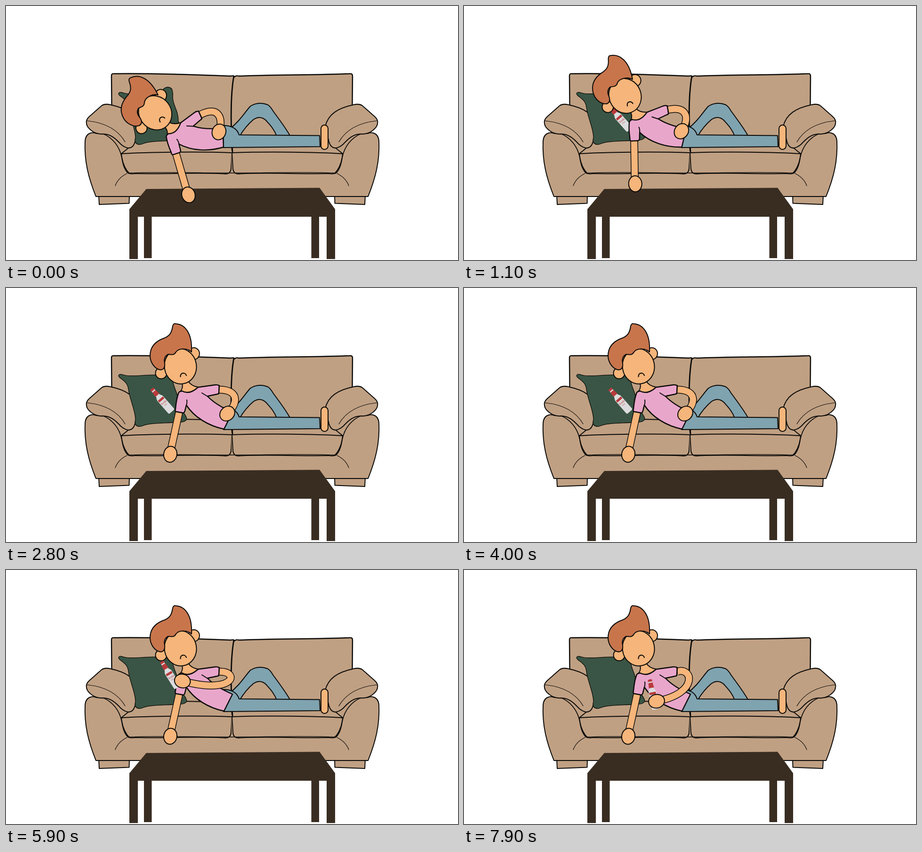
Write an HTML page with a canvas that moves like this. It is 960 px wide and 540 px high and loops after 8 s.

```html
<!DOCTYPE html>
<html lang="en">
<head>
<meta charset="utf-8">
<title>Sofa</title>
<style>
  html, body { margin: 0; width: 100%; height: 100%; overflow: hidden; background: #fff; }
  canvas { display: block; width: 960px; height: 540px; }
</style>
</head>
<body>
<canvas id="stage" width="960" height="540"></canvas>
<script>
const ctx = document.getElementById('stage').getContext('2d');
const INK = '#0a0a08', SOFA = '#c0a083', TABLE = '#392d22', GREEN = '#3a5545',
      JEANS = '#80a3b0', SHIRT = '#e9a6cb', SKIN = '#f6b57a', HAIR = '#c8754c',
      RED = '#b93a3c', GLASS = '#dcdcde';
const LOOP = 8000, STEP = 100;

function paint(path, fill, width) {
  if (fill) { ctx.fillStyle = fill; ctx.fill(path); }
  if (width) { ctx.lineWidth = width; ctx.strokeStyle = INK; ctx.stroke(path); }
}

function shape(d, fill, width = 2) {
  paint(new Path2D(d), fill, width);
}

function oval(x, y, rx, ry, angle = 0) {
  const path = new Path2D();
  path.ellipse(x, y, rx, ry, angle, 0, Math.PI * 2);
  paint(path, SKIN, 2);
}

// A skin-coloured tube with a thin outline
function limb(d) {
  const path = new Path2D(d);
  ctx.lineCap = 'butt';
  for (const [color, width] of [[INK, 16.5], [SKIN, 13.5]]) {
    ctx.strokeStyle = color;
    ctx.lineWidth = width;
    ctx.stroke(path);
  }
  ctx.lineCap = 'round';
}

const ramp = (t, from, to) => Math.min(1, Math.max(0, (t - from) / (to - from)));
const mix = (a, b, k) => a.map((v, i) => v + (b[i] - v) * k);

function sofaSide() {
  shape('M197 403L198 422L261.500 419.500L262 403Z', SOFA);
  shape('M191 405C175 365 166 330 168 287Q170 269 190 269H481V405Z', SOFA, 0);
  shape('M481 405H191C175 365 166 330 168 287Q169 273 180 270Q186 268 192 271', null);
  shape('M272 292L245 314', null, 1.8);
  shape('M330 281C400 277 450 281 478 286Q482 295 480 308', null, 1.8);
  shape('M245 314C247 335 251 347 258 354Q262 358 275 356C340 358 410 353 466 357Q477 357 478 346L480 312C400 309 300 311 245 314Z', SOFA);
  shape('M262 355C330 352 410 355 481 355', null, 1.3);
  shape('M205 271C228 281 241 299 246 322Q250 344 262 356', null, 1.8);
  shape('M232 382C236 371 245 362 257 356', null, 1.2);
  shape('M171 250Q169 242 177 235L203 212Q210 207 222 210C255 217 276 230 282 256L274 289Q270 302 260 302Q252 301 244 294C232 281 222 272 205 272Q196 273 188 269Q172 260 171 250Z', SOFA);
  shape('M172 244C210 248 238 263 253 289', null, 1.2);
}

function sofa() {
  shape('M225 270L224 148Q224 143 230 144C300 143 400 146 477 149Q484 147 485 151Q488 147 495 149C560 146 660 147 730 144Q736 143 736 149L735 270', SOFA, 2.4);
  for (const side of [1, -1]) {
    ctx.save();
    ctx.translate(480, 0);
    ctx.scale(side, 1);
    ctx.translate(-480, 0);
    sofaSide();
    ctx.restore();
  }
  shape('M484 149C478 180 476 240 481 310', null, 2.8);
}

function table() {
  shape('M298 389L666 386.500L699 432V448H262V432Z', TABLE, 0);
  ctx.fillStyle = TABLE;
  for (const x of [262, 681]) ctx.fillRect(x, 447, 18, 91);
  for (const x of [293, 648.5]) ctx.fillRect(x, 447, 16.5, 89);
}

function pillow() {
  shape('M239 187Q239 182 247 184C262 190 295 184 320 185Q331 183 335 176Q344 169 352 176Q355 182 354 195C356 215 366 222 366 245C372 262 384 270 384 279Q380 286 368 285C340 288 305 286 290 293Q280 297 275 290Q273 286 275 280C275 260 262 235 260 215C258 200 248 196 241 190Z', GREEN, 1.3);
}

function legs() {
  shape('M474 262C496 246 507 226 519 213Q536 202 556 210Q562 214 567 223C580 241 592 256 604 277H575C570 262 560 252 552 243Q540 232 526 241C514 251 505 262 496 277Z', JEANS);
  shape('M461 254C480 254 491 261 495 274L666 275.500L667 299L462 301Z', JEANS);
  shape('M669 260.500a7.500 7.500 0 0 1 15 0V297.500a7.500 7.500 0 0 1 -15 0Z', SKIN);
}

function bottle(x, y, degrees) {
  ctx.save();
  ctx.translate(x, y);
  ctx.rotate(degrees * Math.PI / 180);
  shape('M-4 4H4L4.500 19C5 22 8 24 8 28V62Q8 65 5 65H-5Q-8 65 -8 62V28C-8 24 -5 22 -4.500 19Z', GLASS, 0);
  shape('M-4.500 1Q0 -1 4.500 1V5H-4.500ZM-4.500 7.500H4.500L5.500 18.500H-5.500ZM-7 28H7V33H-7Z', RED, 0);
  ctx.textAlign = 'center';
  for (const [text, size, row] of [['Soda', 7, 41], ['clear', 4, 46]]) {
    ctx.font = size + 'px "Liberation Serif", serif';
    ctx.fillText(text, 0, row);
  }
  ctx.restore();
}

function head() {
  shape('M373 198C376 209 375 214 371 219C385 227 398 221 409 211C397 209 391 205 387 198Z', SKIN);
  oval(399, 139.5, 12, 12.5);
  oval(329.5, 181, 12, 12);
  oval(370.5, 166.5, 34, 37.5, -0.15);
  shape('M360 76C380 77 396 96 394 136C386 128 368 127 361 136C357 144 350 141 344 141C337 145 335 151 337 160C338 168 335 174 328 174C315 172 306 157 306 144C306 125 318 114 332 108C348 103 352 95 354 81Q356 75 360 76Z', HAIR);
  shape('M370.500 188.500C370 179 381 179 383 186', null, 2.2);
}

function torso() {
  limb('M369 258L350 345');
  oval(349, 353.5, 14, 17, 0.17);
  shape('M367 222Q370 219 374 219C386 226 398 220 408 211L444 206Q453 205 453 210L452 222Q452 226 447 226L428 230C440 243 460 255 481 264L463 300C430 293 400 275 383 249L380 261Q379 267 373 265L362 263Q358 262 360 257C361 245 363 232 367 222Z', SHIRT, 2.4);
  shape('M384 238Q385 243 383 250M416 223L428 230.500', null);
}

// Each pose: two bend points of the arm, the hand, then the bottle's tip and tilt
const rest  = [497, 217, 492, 247, 470, 267, 309.5, 214, -41];
const reach = [495, 225, 480, 258, 368, 249, 309.5, 214, -41];
const sip   = [505, 200, 490, 280, 386, 214, 366, 161, -16];
const lower = [485, 205, 500, 262, 409, 279, 394.5, 232.5, -11.5];

function poseAt(t) {
  let pose = mix(rest, reach, ramp(t, 4000, 5000));
  pose = mix(pose, sip, ramp(t, 5400, 6750));
  return mix(pose, lower, ramp(t, 6880, 7900));
}

function arm(points) {
  const [bendX, bendY, x, y] = points.slice(2);
  limb('M453 216C' + points);
  shape('M453 207.500L452 224.500', null, 2.4);
  oval(x, y, 17, 14.5, Math.atan2(y - bendY, x - bendX));
}

function draw(t) {
  const pose = poseAt(t), held = t > 5400;
  const lean = -28.6 * (1 - ramp(t, 0, 2040));
  ctx.fillStyle = '#fff';
  ctx.fillRect(0, 0, 960, 540);
  ctx.lineJoin = ctx.lineCap = 'round';
  sofa();
  table();
  pillow();
  legs();
  if (!held) bottle(...pose.slice(6));
  ctx.save();
  ctx.translate(462.5, 302);
  ctx.rotate(lean * Math.PI / 180);
  ctx.translate(-462.5, -302);
  head();
  torso();
  if (held) bottle(...pose.slice(6));
  arm(pose.slice(0, 6));
  ctx.restore();
}

const start = performance.now();
function frame() {
  const t = (performance.now() - start) % LOOP;
  draw(Math.floor(t / STEP) * STEP);
  requestAnimationFrame(frame);
}
frame();
</script>
</body>
</html>
```
